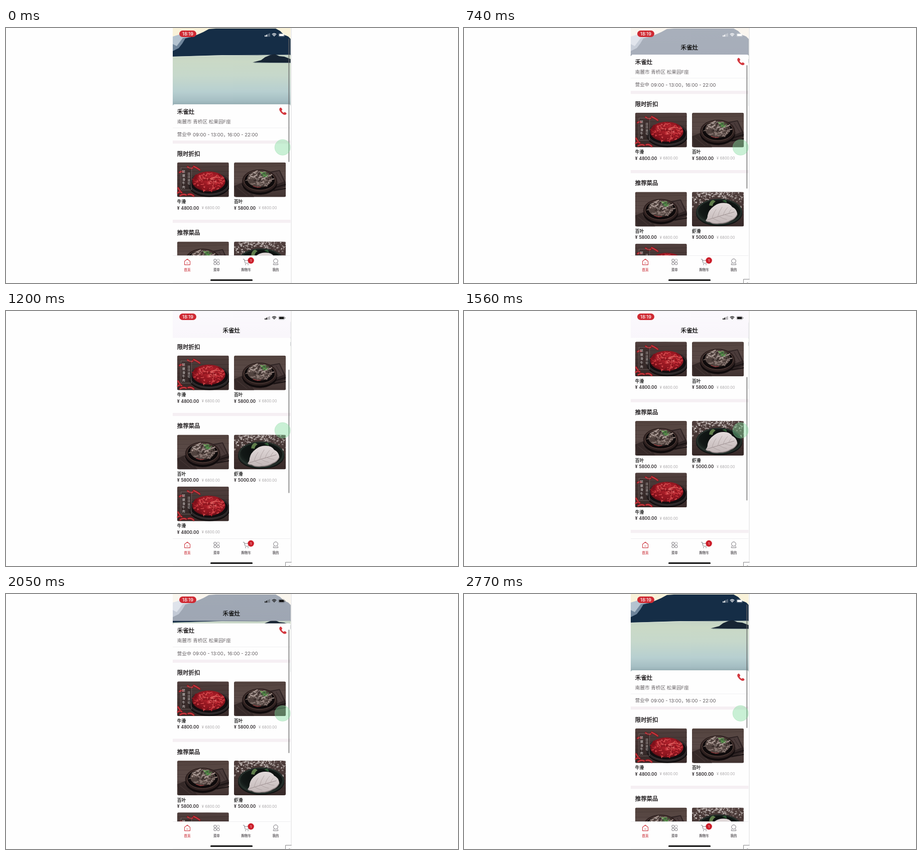
These frames come from a looping animation (900x508 px, 2.87 s). An HTML page:

```html
<!DOCTYPE html>
<html lang="zh">
<head>
<meta charset="utf-8">
<title>Menu scroll</title>
<style>
html, body { margin: 0; width: 100%; height: 100%; overflow: hidden; background: #fefefe; }
svg { display: block; width: 900px; height: 508px; }
text { font-family: Inter, "Noto Sans CJK SC", "Noto Sans CJK", sans-serif; white-space: pre; }
</style>
</head>
<body>
<svg id="stage" viewBox="0 0 900 508" xmlns="http://www.w3.org/2000/svg"></svg>
<script>
const LOOP = 2870;
// how long each picture holds, in 10 ms units
const HOLDS = [8, 10, 8, 10, 8, 10, 10, 10, 8, 10, 8, 10, 10, 8, 10, 8, 10, 10, 11, 10, 8, 10, 8, 10, 8, 10, 10, 8, 8, 10, 10];
const KEYS = [[0, 0], [740, 99], [1200, 179], [1560, 206.5], [1680, 207], [2050, 93.5], [2350, -8], [2410, -7.5], [2770, 0], [2870, 0]];
const SHOP = '禾雀灶';

let seed = 7;
const rnd = (a = 0, b = 1) => {
  seed = (seed * 16807) % 2147483647;
  return a + (b - a) * seed / 2147483647;
};
const pick = list => list[Math.floor(rnd(0, list.length))];
const many = (n, fn) => Array.from({ length: n }, (_, i) => fn(i)).join('');

// text whose glyphs are centred on height cy
const text = (x, cy, size, str, fill, weight = 400, extra = '') =>
  `<text x="${x}" y="${(cy + size * 0.37).toFixed(2)}" font-size="${size}" fill="${fill}" font-weight="${weight}" ${extra}>${str}</text>`;
// medium weight, between regular and bold
const medium = (x, cy, size, str, fill, extra = '') =>
  text(x, cy, size, str, fill, 400, `stroke="${fill}" stroke-width="${size * 0.032}" ${extra}`);
const rect = (x, y, w, h, fill, extra = '') =>
  `<rect x="${x}" y="${y}" width="${w}" height="${h}" fill="${fill}" ${extra}/>`;
const oval = (x, y, rx, ry, fill, extra = '') =>
  `<ellipse cx="${x}" cy="${y}" rx="${rx}" ry="${ry}" fill="${fill}" ${extra}/>`;
const path = (d, fill, extra = '') => `<path d="${d}" fill="${fill}" ${extra}/>`;
const line = (d, color, width, extra = '') =>
  path(d, 'none', `stroke="${color}" stroke-width="${width}" stroke-linecap="round" stroke-linejoin="round" ${extra}`);
const stops = list => list.map(([o, c]) => `<stop offset="${o}" stop-color="${c}"/>`).join('');
const gradient = (id, ...list) => `<linearGradient id="${id}" x2="0" y2="1">${stops(list)}</linearGradient>`;
const glow = (id, ...list) => `<radialGradient id="${id}" cx=".55" cy=".4" r=".65">${stops(list)}</radialGradient>`;
const CENTER = 'text-anchor="middle"';

// short curled strips heaped inside an ellipse, painted from back to front
const heap = (n, cx, cy, rx, ry, colors, width) => many(n, i => {
  const a = rnd(0, 6.283), r = Math.sqrt(rnd()) * 0.9;
  const x = cx + Math.cos(a) * r * rx, y = cy + Math.sin(a) * r * ry;
  const f = v => v.toFixed(1);
  return line(`M${f(x)} ${f(y)}q${f(rnd(-4, 4))} ${f(rnd(-4, 2))} ${f(rnd(-6, 6))} ${f(rnd(-3, 3))}`,
    pick(colors), f(width * (1 - 0.5 * i / n)));
});
const planks = color => many(9, i =>
  line(`M0 ${(i * 8 + rnd(0, 4)).toFixed(1)}q50 ${rnd(-3, 3).toFixed(1)} 103 ${rnd(-4, 2).toFixed(1)}`, color, 0.7, 'opacity=".5"'));
const column = (x, y, step, size, str) =>
  [...str].map((c, i) => text(x, y + i * step, size, c, '#e2dcda', 400, CENTER)).join('');

function beef() {
  const chili = d => line(d, '#7d1219', 4) + line(d, '#b62830', 2.6) + line(d, '#dc6a68', 0.6);
  return rect(0, 0, 103, 69, 'url(#wood)') + planks('#2c201f') +
    chili('M21 9q5 5 10 2') + chili('M33 8q5 2 12 7') + chili('M5 20q3 -3 7 -1') +
    chili('M1 61q4 -4 8 -1') + chili('M6 66q7 -4 12 -1') + chili('M2 51q1 3 4 6') + chili('M22 64q6 -2 11 3') +
    oval(64, 46, 41, 23, '#0f0c0d') + oval(64, 43, 41, 23.5, '#2a2526') +
    oval(64, 42, 38, 21, '#110e10', 'stroke="#5b5355" stroke-width=".6"') +
    oval(63, 38, 33, 20, 'url(#meat)') +
    heap(120, 63, 38, 34, 21, ['#b3222d', '#7c101a', '#c6323a', '#94161f', '#d2474b'], 2.6) +
    heap(45, 65, 34, 28, 14, ['#e4706d', '#d8504f', '#8a131c'], 1.3) +
    rect(8, 11, 21, 44, '#2a2021', 'fill-opacity=".35" stroke="#8f8482" stroke-width=".5"') +
    column(13, 18, 7.8, 6, '鲜嫩滑牛肉') + column(23.5, 22, 6.6, 5, '日日现切');
}

function tripe() {
  return rect(0, 0, 103, 69, 'url(#wood2)') + planks('#3b2d2b') +
    path('M64 20L91 15L103 40V48L78 58L60 50Z', '#2f2424') + path('M72 21L90 17L99 38L82 45Z', '#4a3b3a') +
    line('M76 24L88 41M84 21L95 38', '#2f2424', 0.9) +
    path('M0 47L22 38L40 69H4Z', '#352928') + line('M6 50L26 66M14 45L32 64', '#4c3d3b', 1) +
    line('M78 51L103 44M80 56L103 52', '#191213', 2.2) +
    oval(51, 42, 35, 22.5, '#100b0c') + oval(51, 37, 35, 23, '#2d201f') +
    oval(51, 36, 31, 19.5, '#0e0a0b', 'stroke="#785b52" stroke-width=".8"') +
    oval(51, 33, 25, 16.5, '#51433f') +
    heap(75, 51, 33, 26, 17, ['#8b7a75', '#5d4e4a', '#332826', '#a3928c', '#75655f'], 2.7) +
    heap(35, 50, 28, 19, 11, ['#d3c6c0', '#b8a9a3', '#3d302e'], 1.3) +
    line('M38 47q8 4 15 2', '#a4393c', 1.1) +
    heap(14, 60, 25, 6, 5, ['#4f8a43', '#7bb162', '#2f5f30'], 2);
}

function shrimp() {
  const blossom = many(170, () => {
    const x = rnd(0, 103), edge = 8 + Math.abs(x - 48) * 0.5;
    return oval(x.toFixed(1), rnd(-2, edge).toFixed(1), rnd(0.8, 2.2).toFixed(1), rnd(0.7, 1.8).toFixed(1),
      pick(['#c9c0bd', '#a59a97', '#ddd5d2', '#7c706d']), 'opacity=".8"');
  });
  const leaf = 'M27 57Q31 53 31 47Q33 36 43 29Q53 21 64 22Q75 22 80 30Q89 34 90 44Q86 53 77 56Q68 62 54 62Q42 64 35 59Q31 59 27 57Z';
  return rect(0, 0, 103, 69, 'url(#wood)') + planks('#2c201f') + blossom +
    oval(54, 43, 46, 25, '#0c0f0f') + oval(54, 40, 46, 26.5, '#202a26') +
    oval(54, 39.500, 43, 24, 'url(#plate)', 'stroke="#404c45" stroke-width=".5"') +
    path('M34 27q1 -9 8 -11l5 3q-6 4 -6 9z', '#5f7d4b') + path('M60 18l6 -2q4 3 3 6z', '#2f5a35') +
    path(leaf, '#857a7b', 'transform="translate(.5 1.8)"') + path(leaf, 'url(#paste)') +
    line('M30 56Q55 48 84 40', '#9d9091', 1) +
    line('M40 53q2 -10 8 -18M51 50q2 -10 9 -20M62 47q2 -9 9 -16M73 43q2 -5 5 -8M42 53q7 4 14 6M54 49q8 5 15 6M66 46q8 3 14 3', '#a99d9e', 0.8);
}

const photo = (id, x, y) =>
  `<g transform="translate(${x} ${y})" clip-path="url(#thumb)"><use href="#${id}"/></g>`;
const dish = (id, x, y, name, price) => photo(id, x, y) +
  medium(x, y + 78.3, 8.7, name, '#222') +
  text(x, y + 90.8, 8.5, '¥ ' + price, '#2a2528', 600, 'word-spacing=".9"') +
  text(x + 49, y + 91, 7.4, '¥ 6800.00', '#a9a6a8', 400, 'word-spacing=".6"');
const strip = y => rect(332, y, 235, 6.2, '#f5eff3');
const heading = (y, str) => medium(340.8, y, 11.4, str, '#1c181a');

const hero = rect(332, 0, 235, 155, '#f9f2d9') +
  path('M332 17L342 14L352 10L366 12L366 56H332Z', '#b4c3d0') +
  path('M332 32L340 36L352 20L366 18V56H332Z', '#6f859b') +
  path('M332 55L332 46L344 40L351 31L357 21L372 17L384 12L393 8L404 2L418 1H537L546 6L553 13L562 17L567 22V55Z', '#152d46') +
  rect(332, 54, 235, 101, 'url(#lake)') +
  path('M332 52H567V53L500 54.5L430 54L332 57Z', '#152d46') +
  line('M332 57.5L430 54.8L567 53.6', '#dfe6da', 0.7) +
  path('M491 68.5L508 64L516 58L527 53.5L535 52L544 56L554 57L567 62V69.5Z', '#172534') +
  line('M495 69.6H567', '#8fa3a5', 0.8);

const card = path('M332 700V156q0 -4 4 -4H563q4 0 4 4V700Z', '#fefefe') +
  medium(340.8, 166.3, 11.5, SHOP, '#1c181a') +
  path('M545.2 159.6q1.7 -1.8 3 -.3l1.6 2.2q.8 1.3 -.5 2.3q-.9 .6 -.2 1.6q1.2 1.9 3 3q1 .6 1.7 -.2q1 -1.2 2.2 -.4l2.1 1.6q1.4 1.3 -.4 2.7q-2.4 1.9 -6 -.2q-4.3 -2.7 -6.6 -6.7q-1.9 -3.6 .1 -5.6z', '#d3383f') +
  text(340.8, 186, 9.6, '南麓市 青桥区 松果园F座', '#6d686b') +
  rect(332, 198.6, 235, 0.8, '#ececee') +
  text(340.8, 212, 9.4, '营业中', '#625d60') +
  text(372, 212, 9.5, '09:00 - 13:00，', '#625d60') +
  text(441, 212, 9.5, '16:00 - 22:00', '#625d60') +
  strip(224.2) + heading(250.3, '限时折扣') +
  dish('beef', 340.7, 267.7, '牛滑', '4800.00') + dish('tripe', 454, 267.7, '百叶', '5800.00') +
  strip(382) + heading(407.8, '推荐菜品') +
  dish('tripe', 340.7, 425.5, '百叶', '5800.00') + dish('shrimp', 454, 425.5, '虾滑', '5000.00') +
  dish('beef', 340.7, 528.7, '牛滑', '4800.00') + strip(642.5);

const status = many(4, i => rect(515.2 + i * 2.8, 14.6 - i * 1.4, 2, 2.6 + i * 1.4, 'currentColor', `rx=".5" opacity="${i < 2 ? 1 : 0.35}"`)) +
  line('M530.3 12.6Q534 9.2 537.7 12.6M531.9 14.5Q534 12.7 536.1 14.5', 'currentColor', 1.4) +
  path('M532.8 15.7Q534 14.9 535.2 15.7L534 17.2Z', 'currentColor') +
  rect(542.8, 10.7, 11.8, 6.4, 'none', 'rx="1.8" stroke="currentColor" stroke-width=".6" stroke-opacity=".55"') +
  rect(543.9, 11.8, 9.6, 4.2, 'currentColor', 'rx="1"') +
  rect(555.2, 12.8, 1, 2.2, 'currentColor', 'rx=".5" opacity=".6"');

const GREY = '#77747a';
const label = (x, str, color) => medium(x, 482, 6.4, str, color, CENTER);
const tabs = rect(332, 453.3, 235, 52.7, '#fefefe') + rect(332, 453, 235, 0.8, '#ececee') +
  line('M355.5 464.7L361 460.3L366.5 464.7V471.6H355.5Z', '#cf4048', 1.1) + line('M359.3 468.2H362.7', '#cf4048', 0.8) +
  many(4, i => rect(414 + (i % 2) * 6.2, 460.7 + (i >> 1) * 6.2, 4.6, 4.6, 'none',
    `rx="1.1" stroke="${i === 1 ? '#aaa6aa' : GREY}" stroke-width="1"`)) +
  line('M472.2 460.7H474.3L476.3 468.6H482.8L484 463.2H475', GREY, 0.9) +
  oval(477, 471.3, 0.9, 0.9, GREY) + oval(482, 471.3, 0.9, 0.9, GREY) +
  oval(487.6, 463.1, 6.3, 6.3, '#cc1f2b') + text(487.6, 463.2, 6.6, '1', '#fff', 400, CENTER) +
  oval(537, 464.2, 4.3, 4.3, 'none', `stroke="${GREY}" stroke-width="1"`) +
  line('M534.3 467.6L532.3 470.3V471.6H541.7V470.3L539.7 467.6', GREY, 1) +
  label(361, '首页', '#cf4048') + label(419.3, '菜单', '#605c60') +
  label(478.2, '购物车', '#605c60') + label(537, '我的', '#605c60') +
  rect(407, 500.8, 84, 3, '#0c0c0c', 'rx="1.5"');

const svg = document.getElementById('stage');
svg.innerHTML = `<defs>
  ${gradient('lake', [0, '#c5d3c5'], [0.12, '#cad9c6'], [0.4, '#c6d8cb'], [0.72, '#b7cfd0'], [0.9, '#a5bec3'], [1, '#91a9ae'])}
  ${gradient('wood', [0, '#503f3d'], [1, '#382a29'])}
  ${gradient('wood2', [0, '#54443f'], [0.5, '#5a4a47'], [1, '#403230'])}
  ${gradient('bar', [0, '#fbf9fd'], [1, '#f9f6fb'])}
  ${gradient('paste', [0, '#e2dada'], [1, '#c3b8b8'])}
  ${glow('meat', [0, '#b8242e'], [0.7, '#8c151f'], [1, '#560c13'])}
  ${glow('plate', [0, '#070909'], [0.75, '#121816'], [1, '#25302b'])}
  <clipPath id="phone"><rect x="332" y="0" width="234.6" height="506"/></clipPath>
  <clipPath id="thumb"><rect width="103.2" height="69" rx="3.2"/></clipPath>
  <g id="beef">${beef()}</g><g id="tripe">${tripe()}</g><g id="shrimp">${shrimp()}</g>
</defs>
${rect(0, 0, 900, 508, '#fefefe')}
${rect(567.6, 0, 1, 508, '#dcdcde')}${rect(332, 505.6, 236, 0.8, '#ebebed')}
<g clip-path="url(#phone)">
  <g id="hero">${hero}</g>
  <g id="card">${card}</g>
  <g id="head">${rect(332, 0, 235, 53.6, 'url(#bar)')}</g>
  <g id="name">${medium(448.7, 38.3, 11.5, SHOP, '#111', CENTER)}</g>
  ${rect(345, 5, 34, 13, '#cf2a33', 'rx="6.5"')}
  ${text(362, 11.5, 9.1, '18:19', '#fff', 500, CENTER)}
  <g id="status">${status}</g>
  ${tabs}
  <rect id="thumbBar" x="562.3" width="2.1" rx="1" fill="#666" fill-opacity=".68"/>
  <circle cx="550.7" cy="237.8" r="15.7" fill="#7fdc9c" fill-opacity=".42" stroke="#8fcfa2" stroke-opacity=".5" stroke-width=".6"/>
</g>
<g id="corner">${rect(556, 500, 12.5, 8, '#fefefe')}${path('M556.5 508V500.5H568.5', 'none', 'stroke="#88888b"')}${rect(563, 507, 3, 0.8, '#99999c')}</g>`;

const get = id => document.getElementById(id);
const [heroEl, cardEl, headEl, nameEl, statusEl, barEl, cornerEl] =
  ['hero', 'card', 'head', 'name', 'status', 'thumbBar', 'corner'].map(get);

// monotone cubic through the scroll keys
const slope = i => (KEYS[i + 1][1] - KEYS[i][1]) / (KEYS[i + 1][0] - KEYS[i][0]);
const tangents = KEYS.map((_, i) => {
  if (i === 0 || i === KEYS.length - 1) return 0;
  const a = slope(i - 1), b = slope(i);
  return a * b <= 0 ? 0 : 2 * a * b / (a + b);
});
function scrollAt(t) {
  let i = 0;
  while (i < KEYS.length - 2 && t >= KEYS[i + 1][0]) i++;
  const [t0, a] = KEYS[i], [t1, b] = KEYS[i + 1];
  const d = t1 - t0, u = (t - t0) / d, v = 1 - u;
  return a * v * v * (1 + 2 * u) + b * u * u * (3 - 2 * u) +
    d * u * v * (tangents[i] * v - tangents[i + 1] * u);
}

function held(t) {
  let start = 0;
  for (const h of HOLDS) {
    if (t < start + h * 10) break;
    start += h * 10;
  }
  return start;
}

function draw(now) {
  const t = held(now % LOOP);
  const s = scrollAt(t);
  const pull = Math.max(0, -s);
  const alpha = Math.min(1, Math.max(0, s / 155));
  heroEl.setAttribute('transform', `scale(1 ${1 + pull / 310})`);
  cardEl.setAttribute('transform', `translate(0 ${-s})`);
  headEl.setAttribute('opacity', alpha);
  nameEl.setAttribute('opacity', Math.min(1, alpha * 1.7));
  statusEl.setAttribute('color', t >= 820 && t < 2230 ? '#111' : '#fff');
  barEl.setAttribute('y', 21 + Math.max(0, s) * 0.535);
  barEl.setAttribute('height', 246 - pull);
  cornerEl.setAttribute('visibility', t >= 80 ? 'visible' : 'hidden');
}

function tick() {
  draw(performance.now());
  requestAnimationFrame(tick);
}
tick();
</script>
</body>
</html>
```
